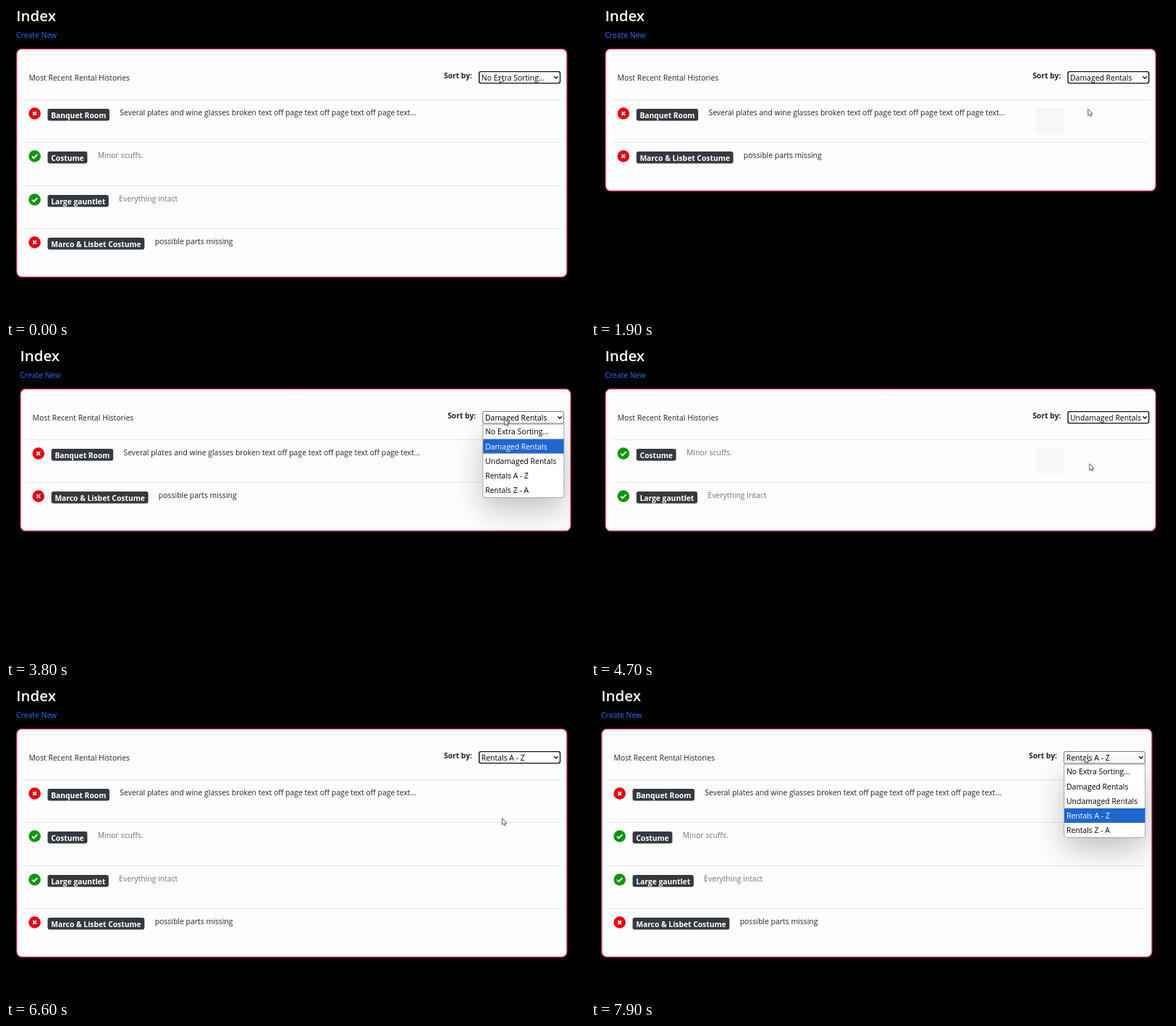
Write an HTML page with a canvas that moves like this. It is 800 by 431 pixels and loops after 8000 ms.

```html
<!DOCTYPE html>
<html lang="en">
<head>
<meta charset="utf-8">
<title>Rental histories</title>
<style>
  html, body { margin: 0; height: 100%; overflow: hidden; background: #000; }
  canvas { display: block; }
</style>
</head>
<body>
<canvas id="stage" width="800" height="431"></canvas>
<script>
const ctx = document.getElementById('stage').getContext('2d');
const LOOP = 8000, STEP = 100;
const REGULAR = '10.45px "Open Sans", sans-serif';
const BOLD = 'bold 10.3px "Open Sans", sans-serif';
const HEADING = '600 20.5px "Open Sans", sans-serif';

const ROW_TOP = 129, ROW_HEIGHT = 59.4;
const SELECT_Y = 97, LIST_TOP = 108, OPTION_HEIGHT = 20.2;
const OPTIONS = ['No Extra Sorting...', 'Damaged Rentals', 'Undamaged Rentals', 'Rentals A - Z', 'Rentals Z - A'];
const RENTALS = [
  { name: 'Banquet Room', damaged: true, note: 'Several plates and wine glasses broken text off page text off page text off page text...' },
  { name: 'Costume', damaged: false, note: 'Minor scuffs.' },
  { name: 'Large gauntlet', damaged: false, note: 'Everything intact' },
  { name: 'Marco & Lisbet Costume', damaged: true, note: 'possible parts missing' },
];
// Each round opens the list and picks the next option; the last is cut off by the loop.
const ROUNDS = [
  { open: 100, pick: 1900 },
  { open: 3700, pick: 4700 },
  { open: 5400, pick: 6500 },
  { open: 7400, pick: LOOP + 1000 },
];
const CURSOR = new Path2D('M0 0V9L2.1 7.1L3.5 10.2L5 9.5L3.7 6.6H6.3Z');

const optionY = i => LIST_TOP + OPTION_HEIGHT * (i + 0.7);

function ease(t, start, end, from, to) {
  const u = Math.min(1, Math.max(0, (t - start) / (end - start)));
  return from + (to - from) * u * u * (3 - 2 * u);
}

function pointerAt(t, selected) {
  const { open, pick } = ROUNDS[selected];
  const x = 682 + 7 * Math.sin(Math.PI * t / LOOP);
  const y = selected > 0 && t < open
    ? ease(t, ROUNDS[selected - 1].pick + 200, open, optionY(selected), SELECT_Y)
    : ease(t, pick - 1000, pick - 300, SELECT_Y, optionY(selected + 1));
  return [x, y];
}

function text(str, x, y, color, font = REGULAR) {
  ctx.font = font;
  ctx.fillStyle = color;
  ctx.fillText(str, x, y);
}

function box(x, y, w, h, r, fill, stroke, lineWidth = 1) {
  ctx.beginPath();
  ctx.roundRect(x, y, w, h, r);
  ctx.fillStyle = fill;
  ctx.fill();
  if (!stroke) return;
  ctx.strokeStyle = stroke;
  ctx.lineWidth = lineWidth;
  ctx.stroke();
}

function line(points, color, width) {
  ctx.beginPath();
  points.forEach(([x, y]) => ctx.lineTo(x, y));
  ctx.strokeStyle = color;
  ctx.lineWidth = width;
  ctx.stroke();
}

const rule = (y, color) => line([[23.5, y], [766.5, y]], color, 1);

function statusIcon(x, y, damaged) {
  ctx.beginPath();
  ctx.arc(x, y, 8.3, 0, 7);
  ctx.fillStyle = damaged ? '#e60012' : '#0f960f';
  ctx.fill();
  if (damaged) {
    for (const d of [-2.3, 2.3]) line([[x - d, y - 2.3], [x + d, y + 2.3]], '#fff', 1.9);
  } else {
    line([[x - 3.6, y + 0.2], [x - 1.1, y + 2.6], [x + 3.7, y - 2.3]], '#fff', 1.9);
  }
}

function rentalRow({ name, damaged, note }, i) {
  const y = Math.round(ROW_TOP + i * ROW_HEIGHT) + 0.5;
  rule(y, '#e3e5e8');
  statusIcon(39.6, y + 19, damaged);
  ctx.font = BOLD;
  const width = ctx.measureText(name).width + 9.4;
  box(57.5, y + 12.5, width, 16.4, 3, '#343a40');
  text(name, 62.2, y + 25, '#fff', BOLD);
  text(note, 57.5 + width + 14.3, y + 21.5, damaged ? '#212529' : '#6c757d');
}

function selectBox(label, open) {
  if (open) box(653.5, 90.5, 112, 16.5, 2, '#fff', '#767676');
  else box(653.8, 90.6, 111.8, 16, 2.5, '#fff', '#101010', 1.4);
  text(label, 656.8, 103, '#000');
  line([[757.3, 97.2], [760, 99.9], [762.7, 97.2]], '#111', 1.4);
}

function optionList(active) {
  ctx.save();
  ctx.shadowColor = 'rgba(0,0,0,.24)';
  ctx.shadowBlur = 40;
  ctx.shadowOffsetY = 16;
  box(653.7, LIST_TOP, 112, 101.5, [0, 0, 4, 4], '#fff');
  ctx.restore();
  box(653.7, LIST_TOP, 112, 101.5, [0, 0, 4, 4], '#fff', '#a5a5a5');
  OPTIONS.forEach((label, i) => {
    const y = LIST_TOP + i * OPTION_HEIGHT;
    if (i === active) box(654, y + 0.4, 111.5, OPTION_HEIGHT - 0.3, 0, '#1f66cf');
    text(label, 657, y + 14.3, i === active ? '#fff' : '#000');
  });
}

function hoverButton() {
  box(609, 140.5, 40.5, 36, 2, '#f9f6f7');
  for (const x of [624.5, 631]) box(x, 157.5, 2, 2, 1, '#fff');
}

function pointer(x, y) {
  ctx.save();
  ctx.translate(x, y);
  ctx.fillStyle = '#fff';
  ctx.fill(CURSOR);
  ctx.strokeStyle = '#333';
  ctx.lineWidth = 0.8;
  ctx.stroke(CURSOR);
  ctx.restore();
}

function draw(t) {
  const selected = ROUNDS.findIndex(r => t < r.pick);
  const filtered = selected === 1 || selected === 2;
  const rows = filtered ? RENTALS.filter(r => r.damaged === (selected === 1)) : RENTALS;
  const open = t >= ROUNDS[selected].open;
  const [px, py] = pointerAt(t, selected);

  ctx.fillStyle = '#000';
  ctx.fillRect(0, 0, 800, 431);
  ctx.save();
  // The short page has no scrollbar, so its content sits further right.
  if (filtered) ctx.translate(5.2, 0);
  text('Index', 14.2, 21.2, '#fff', HEADING);
  text('Create New', 14, 44, '#2270fa');
  box(14.8, 59.3, 760.2, 77.4 + rows.length * ROW_HEIGHT, 7, '#fdfdfd', '#d23a50', 1.3);
  rule(67.5, '#f1eef0');
  text('Most Recent Rental Histories', 31.4, 102.5, '#212529');
  text('Sort by:', 605, 100.2, '#212529', BOLD);
  rows.forEach(rentalRow);
  if (filtered && !open && py > ROW_TOP) hoverButton();
  selectBox(OPTIONS[selected], open);
  if (open) {
    const hovered = Math.floor((py - LIST_TOP) / OPTION_HEIGHT);
    optionList(hovered < 0 ? selected : hovered);
  }
  ctx.restore();
  pointer(px, py);
}

function tick() {
  draw(Math.floor(performance.now() % LOOP / STEP) * STEP);
  requestAnimationFrame(tick);
}
tick();
</script>
</body>
</html>
```
